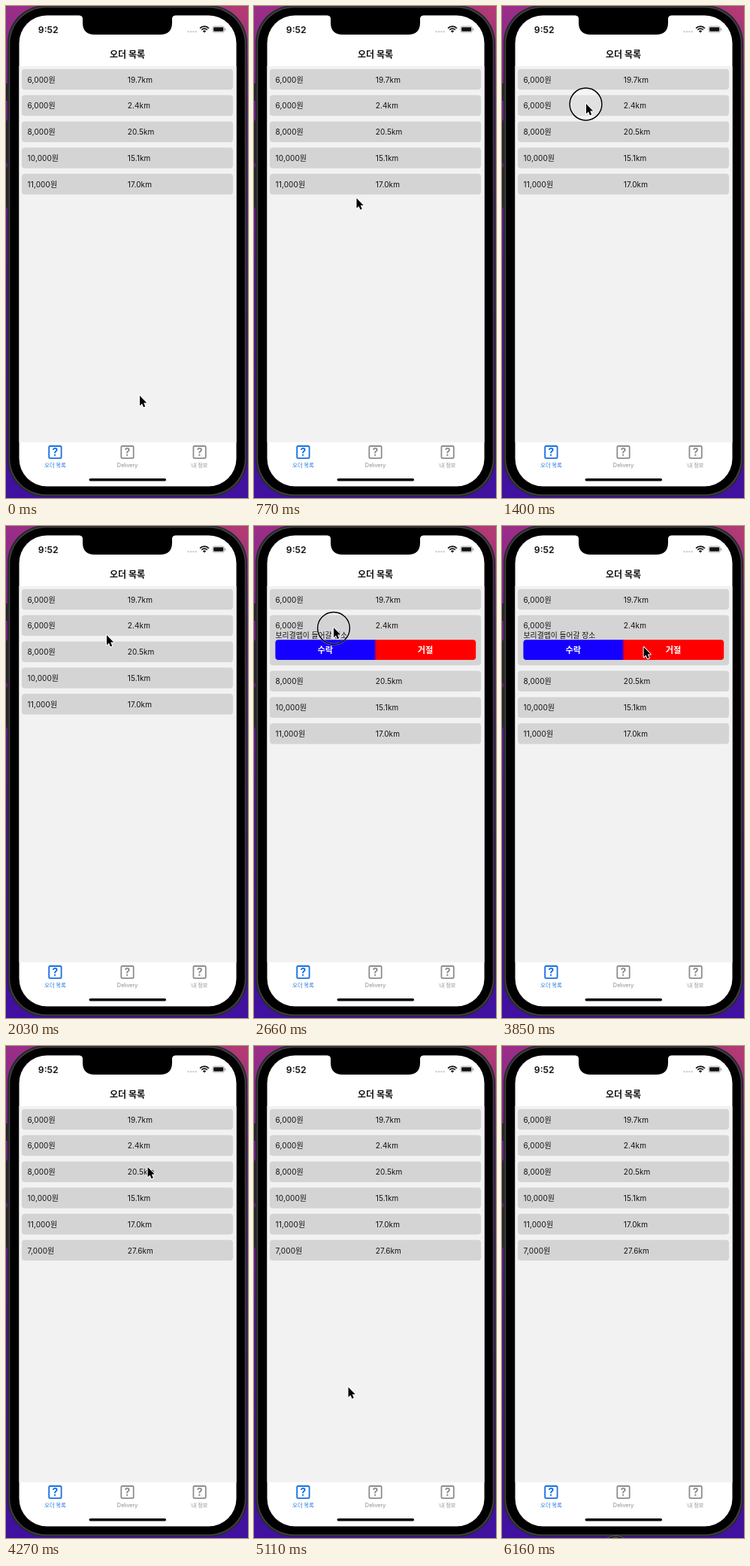
Animation of 322x654 px, one loop 6.23 s. Source, as an HTML page with a canvas:

```html
<!DOCTYPE html>
<html lang="ko">
<head>
<meta charset="utf-8">
<title>오더 목록</title>
<style>
  html, body { margin: 0; width: 100%; height: 100%; overflow: hidden; background: #000; }
  canvas { display: block; width: 322px; height: 654px; }
</style>
</head>
<body>
<canvas id="stage"></canvas>
<script>
const W = 322, H = 654, LOOP = 6230, TICK = 70;
const FONT = 'Inter, "Noto Sans CJK KR", sans-serif';
const canvas = document.getElementById('stage');
const ctx = canvas.getContext('2d');
const dpr = window.devicePixelRatio || 1;
canvas.width = W * dpr;
canvas.height = H * dpr;

const orders = [
  ['6,000원', '19.7km'], ['6,000원', '2.4km'], ['8,000원', '20.5km'],
  ['10,000원', '15.1km'], ['11,000원', '17.0km'], ['7,000원', '27.6km']
];
const OPENED = 2660, REJECTED = 4270;

// Pointer strokes: start time, end time, end position
const strokes = [
  [210, 420, 151, 343], [560, 980, 122, 168], [1050, 1330, 112, 130],
  [1890, 2030, 134, 145], [2450, 2590, 106, 135], [3150, 3360, 165, 150],
  [3430, 3570, 188.6, 161], [4410, 4550, 199, 183], [4620, 4830, 162, 317],
  [5040, 5180, 89, 590], [5460, 5600, 106, 608], [5950, 6160, 151, 674]
];

// Press rings: start, end, centre
const presses = [
  [1400, 1610, 111.5, 130.5], [2590, 2870, 106, 135.8],
  [3570, 3850, 188.5, 159], [6160, 6230, 151, 673.8]
];

function pointerAt(t) {
  let x = 178, y = 518;
  for (const [start, end, toX, toY] of strokes) {
    if (t <= start) break;
    const p = Math.min(1, (t - start) / (end - start));
    const k = p * p * (3 - 2 * p);
    x += (toX - x) * k;
    y += (toY - y) * k;
  }
  return [x, y];
}

function box(x, y, w, h, r, fill) {
  ctx.beginPath();
  ctx.roundRect(x, y, w, h, r);
  ctx.fillStyle = fill;
  ctx.fill();
}

function label(str, x, y, size, color = '#111', weight = 400, align = 'left') {
  ctx.font = `${weight} ${size}px ${FONT}`;
  ctx.textAlign = align;
  ctx.fillStyle = color;
  ctx.fillText(str, x, y);
}

function wallpaper() {
  const g = ctx.createLinearGradient(0, 0, 0, H);
  g.addColorStop(0, '#9c2e88');
  g.addColorStop(0.2, '#702088');
  g.addColorStop(0.6, '#4a148c');
  g.addColorStop(1, '#4010a0');
  ctx.fillStyle = g;
  ctx.fillRect(0, 0, W, H);
  const glow = ctx.createRadialGradient(W, 0, 0, W, 0, 90);
  glow.addColorStop(0, 'rgba(200,70,100,0.6)');
  glow.addColorStop(1, 'rgba(200,70,100,0)');
  ctx.fillStyle = glow;
  ctx.fillRect(0, 0, W, H);
}

function phone() {
  for (const [y, h] of [[103, 23], [152, 57], [214, 54]]) box(0, y, 5, h, 1, '#262628');
  box(2, -0.8, 319, 653, 50, '#29292b');
  box(3.8, 0.8, 315.4, 649.9, 49, '#404043');
  box(5.3, 2.3, 312.4, 646.9, 48, '#000');
}

function statusBar() {
  label('9:52', 56.2, 35.5, 12.2, '#111', 600, 'center');

  ctx.fillStyle = '#c4c4c4';
  for (let i = 0; i < 4; i++) ctx.fillRect(241.5 + i * 3.4, 33.2, 2, 2);

  ctx.strokeStyle = '#111';
  ctx.lineWidth = 1.7;
  for (const r of [8.1, 5.1]) {
    ctx.beginPath();
    ctx.arc(264, 35.2, r, -Math.PI * 0.76, -Math.PI * 0.24);
    ctx.stroke();
  }
  ctx.beginPath();
  ctx.moveTo(264, 35.4);
  ctx.arc(264, 35.4, 2.9, -Math.PI * 0.76, -Math.PI * 0.24);
  ctx.fillStyle = '#111';
  ctx.fill();

  ctx.beginPath();
  ctx.roundRect(274.9, 27, 15.6, 8, 2.3);
  ctx.strokeStyle = '#999';
  ctx.lineWidth = 0.8;
  ctx.stroke();
  box(276.1, 28.2, 13.2, 5.6, 1.2, '#111');
  box(291.4, 29.7, 1.1, 2.7, 0.5, '#999');
}

function notch() {
  ctx.beginPath();
  ctx.moveTo(98, 12);
  ctx.lineTo(98, 12.5);
  ctx.quadraticCurveTo(102, 13, 102, 17);
  ctx.lineTo(102, 22);
  ctx.quadraticCurveTo(102, 38, 118, 38);
  ctx.lineTo(205, 38);
  ctx.quadraticCurveTo(221, 38, 221, 22);
  ctx.lineTo(221, 17);
  ctx.quadraticCurveTo(221, 13, 225, 12.5);
  ctx.lineTo(225, 12);
  ctx.fillStyle = '#000';
  ctx.fill();
}

function orderList(t) {
  const count = t >= REJECTED ? 6 : 5;
  const open = t >= OPENED && t < REJECTED;
  for (let i = 0; i < count; i++) {
    const y = 83.8 + i * 34.8 + (open && i > 1 ? 39.2 : 0);
    const expanded = open && i === 1;
    box(21, y, 281, expanded ? 66.7 : 27.5, 4, '#d4d4d4');
    ctx.letterSpacing = '0.1px';
    label(orders[i][0], 28.6, y + 17.7, 10);
    label(orders[i][1], 161.8, y + 17.7, 10);
    ctx.letterSpacing = '0px';
    if (expanded) details(y);
  }
}

function details(y) {
  label('보리결맵이 들어갈 장소', 28.6, y + 30, 9.8);
  const split = ctx.createLinearGradient(159.5, 0, 163, 0);
  split.addColorStop(0, '#1500ff');
  split.addColorStop(1, '#ff0000');
  ctx.filter = 'blur(0.5px)';
  box(28.4, y + 32.7, 266.8, 26.8, 4, split);
  ctx.filter = 'none';
  label('수락', 94.8, y + 50.3, 11.2, '#fff', 600, 'center');
  label('거절', 228, y + 50.3, 11.2, '#fff', 600, 'center');
}

function tab(name, x, color) {
  ctx.beginPath();
  ctx.roundRect(x - 8.2, 585, 16.4, 16.2, 1.6);
  ctx.strokeStyle = color;
  ctx.lineWidth = 1.8;
  ctx.stroke();
  label('?', x, 598, 14, color, 700, 'center');
  label(name, x, 613.2, 7.1, color, 400, 'center');
}

function screen(t) {
  ctx.save();
  ctx.beginPath();
  ctx.roundRect(17.5, 12.5, 289, 626, 37);
  ctx.clip();
  ctx.fillStyle = '#fff';
  ctx.fillRect(17, 12, 290, 627);
  ctx.fillStyle = '#f2f2f2';
  ctx.fillRect(17, 80, 290, 500);
  statusBar();
  label('오더 목록', 161.5, 68.6, 12, '#111', 600, 'center');
  orderList(t);
  tab('오더 목록', 65.4, '#166fe3');
  tab('Delivery', 161.5, '#8c8c8d');
  tab('내 정보', 257.6, '#8c8c8d');
  box(110.5, 628, 102.5, 3.6, 1.8, '#000');
  ctx.restore();
  notch();
}

function pressRing(t) {
  const hit = presses.find(([start, end]) => t >= start && t < end);
  if (!hit) return;
  const [start, , x, y] = hit;
  ctx.beginPath();
  ctx.arc(x, y, 21.4, 0, Math.PI * 2);
  // The disc is filled only while the button is held down
  if (t < start + TICK) {
    ctx.fillStyle = 'rgba(255,255,255,0.3)';
    ctx.fill();
  }
  ctx.strokeStyle = 'rgba(255,255,255,0.4)';
  ctx.lineWidth = 2.8;
  ctx.stroke();
  ctx.strokeStyle = '#000';
  ctx.lineWidth = 1.5;
  ctx.stroke();
}

function pointer(t) {
  const [x, y] = pointerAt(t);
  const arrow = new Path2D('M0 0V13.2L3 10.4L5 15.2L7.2 14.3L5.2 9.6H9.2Z');
  ctx.save();
  ctx.translate(x, y);
  ctx.lineJoin = 'round';
  ctx.strokeStyle = '#fff';
  ctx.lineWidth = 2;
  ctx.stroke(arrow);
  ctx.fillStyle = '#000';
  ctx.fill(arrow);
  ctx.restore();
}

function draw(now) {
  const t = Math.floor((now % LOOP) / TICK) * TICK;
  ctx.setTransform(dpr, 0, 0, dpr, 0, 0);
  wallpaper();
  phone();
  screen(t);
  pressRing(t);
  pointer(t);
}

const begin = performance.now();
function frame() {
  draw(performance.now() - begin);
  requestAnimationFrame(frame);
}
frame();
</script>
</body>
</html>
```
